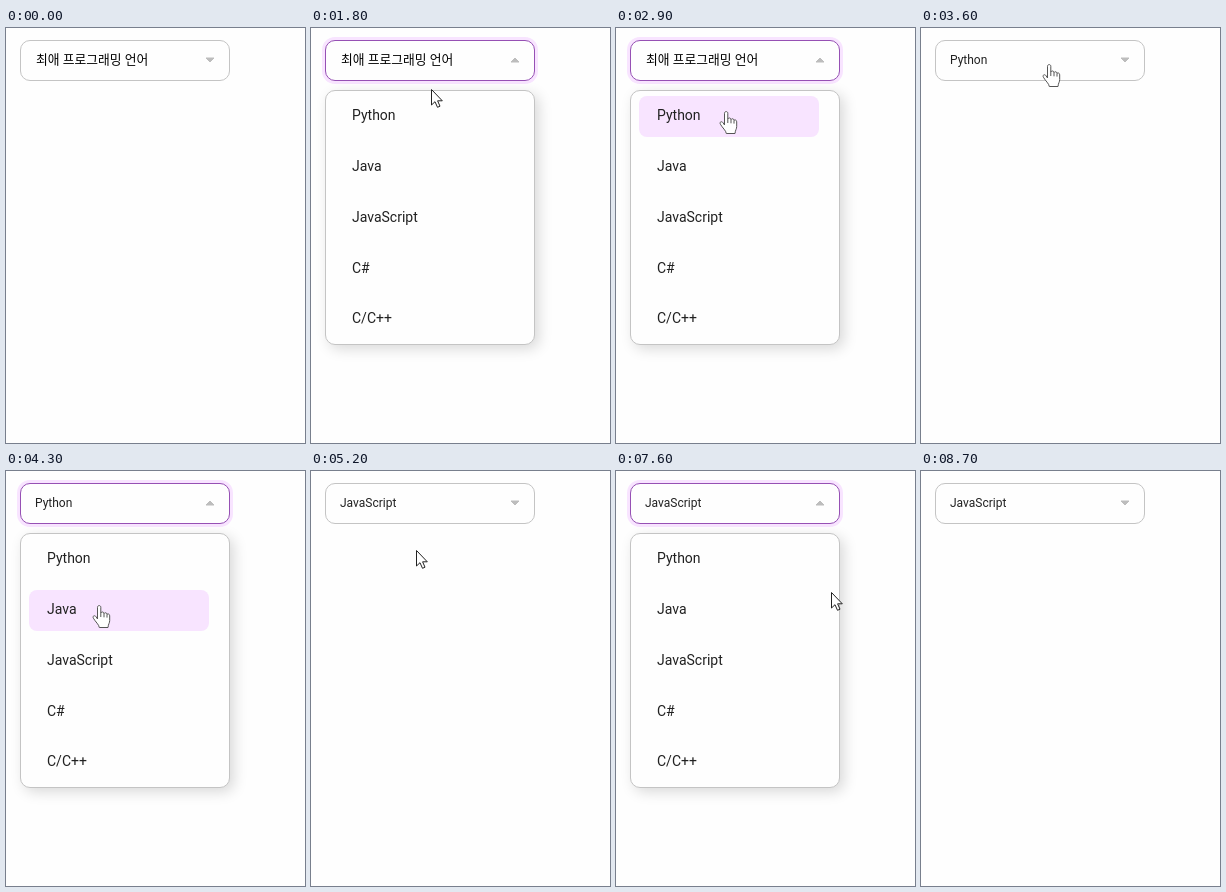
Write an HTML page that moves like this. It is 299 px wide and 415 px high and loops after 9.9 s.

```html
<!DOCTYPE html>
<html lang="ko">
<head>
<meta charset="utf-8">
<style>
  html, body { margin: 0; width: 100%; height: 100%; overflow: hidden; background: #fefefe; }
  body { position: relative; font-family: Roboto, "Noto Sans CJK KR", "Noto Sans CJK", sans-serif; color: #212121; }
  .select, .menu {
    position: absolute; left: 14px; width: 210px; box-sizing: border-box;
    border: 1px solid #c4c4c4; border-radius: 10px; background: #fefefe;
  }
  .select { top: 12px; height: 41px; font-size: 12px; line-height: 38px; padding-left: 14px; }
  .select.focus { border-color: #9650b4; box-shadow: 0 0 0 3px #f8e4ff; }
  .select.placeholder { padding-left: 15px; font-size: 12.8px; font-weight: 300; color: #000; }
  .menu { top: 62px; height: 255px; box-shadow: 4px 4px 14px rgba(0, 0, 0, .15); }
  .item {
    position: absolute; left: 8px; width: 180px; height: 41px; box-sizing: border-box;
    padding-left: 18px; border-radius: 8px; font-size: 14px; line-height: 38px;
  }
  .item.hover { background: #f8e4ff; }
  svg { position: absolute; left: 0; top: 0; width: 299px; height: 415px; }
</style>
</head>
<body>
<div class="select"></div>
<div class="menu"></div>
<svg viewBox="0 0 299 415">
  <path id="caret" fill="#bdbdbd" stroke="#bdbdbd" stroke-linejoin="round"/>
  <g id="cursor" fill="#fff" stroke-linejoin="round">
    <path id="arrow" stroke="#222" d="M-.5 -.5V15L3 11.7 5.5 17.3 8 16.2 5.6 10.8H10.3Z"/>
    <g id="hand" stroke="#555">
      <path d="M-1.5 13V1.3C-1.5 -1 1.8 -1 1.8 1.3V7C2.2 5.5 5 5.6 5 7.6C5.6 6.2 8 6.6 8 8.4C8.8 7.4 10.7 8 10.7 9.8V14.5C10.7 17 9.3 18 9 21.5H.3C0 18.5 -3.5 16 -5.6 12.2C-6.8 10 -4.3 8.8 -3 10.7Z"/>
      <path fill="none" d="M1.8 7V11M5 7.6V11.3M8 8.4V11.6"/>
    </g>
  </g>
</svg>
<script>
const LOOP = 9900, STEP = 100, PRESS = 100;
const ENTER = 100, LEAVE = 8700;
const languages = ["Python", "Java", "JavaScript", "C#", "C/C++"];

const linear = k => k;
const easeIn = k => k ** 3;
const easeOut = k => 1 - (1 - k) ** 2;

const entry = { x: 168, y: 328 };
const moves = [
  { from: 100, to: 700, x: 122, y: 35, ease: linear },
  { from: 1500, to: 2100, x: 115, y: 250, ease: easeIn },
  { from: 2200, to: 2900, x: 110, y: 84, ease: linear },
  { from: 3200, to: 3600, x: 128, y: 37, ease: linear },
  { from: 3900, to: 4600, x: 67, y: 208, ease: linear },
  { from: 5000, to: 5400, x: 119, y: 37, ease: easeOut },
  { from: 7200, to: 7800, x: 264, y: 165, ease: linear },
  { from: 8100, to: 8600, x: 266, y: 390, ease: linear }
];
const presses = [1300, 3000, 3800, 4900, 5600, 6400, 7100, 8100];

const find = selector => document.querySelector(selector);
const select = find(".select"), menu = find(".menu"), caret = find("#caret");
const cursor = find("#cursor"), arrow = find("#arrow"), hand = find("#hand");
const show = (el, on) => { el.style.display = on ? "" : "none"; };
const inside = (p, left, top, w, h) => p.x >= left && p.x < left + w && p.y >= top && p.y < top + h;
const rowTop = i => Math.round(68.2 + 50.8 * i);
const onHeader = p => inside(p, 14, 12, 210, 41);
const rowAt = p => languages.findIndex((_, i) => inside(p, 23, rowTop(i), 180, 41));

const items = languages.map((name, i) => {
  const item = document.createElement("div");
  item.className = "item";
  item.textContent = name;
  item.style.top = rowTop(i) - 63 + "px";
  return menu.appendChild(item);
});

function pointerAt(t) {
  let { x, y } = entry;
  for (const move of moves) {
    if (t <= move.from) break;
    const k = move.ease(Math.min(1, (t - move.from) / (move.to - move.from)));
    x += (move.x - x) * k;
    y += (move.y - y) * k;
  }
  return { x: Math.round(x), y: Math.round(y) };
}

// Replays the clicks: pressing moves the focus, releasing toggles the menu or picks a row.
function stateAt(t) {
  const state = { open: false, focus: false, chosen: -1 };
  for (const press of presses) {
    if (t < press) break;
    const point = pointerAt(press), header = onHeader(point);
    state.focus = header;
    if (t < press + PRESS) break;
    if (state.open && rowAt(point) >= 0) state.chosen = rowAt(point);
    state.open = header && !state.open;
  }
  return state;
}

function draw(t) {
  const { open, focus, chosen } = stateAt(t);
  const point = pointerAt(t);
  const visible = t >= ENTER && t < LEAVE;
  const hovered = open && visible ? rowAt(point) : -1;
  const pointing = onHeader(point) || hovered >= 0;

  select.textContent = languages[chosen] || "최애 프로그래밍 언어";
  select.classList.toggle("placeholder", chosen < 0);
  select.classList.toggle("focus", focus);
  caret.setAttribute("d", open ? "M200 34H208L204 30Z" : "M200 30H208L204 34Z");
  show(menu, open);
  items.forEach((item, i) => item.classList.toggle("hover", i === hovered));

  show(cursor, visible);
  show(hand, pointing);
  show(arrow, !pointing);
  cursor.setAttribute("transform", `translate(${point.x} ${point.y})`);
}

const start = performance.now();
function frame() {
  const t = (performance.now() - start) % LOOP;
  draw(Math.floor(t / STEP) * STEP);
  requestAnimationFrame(frame);
}
frame();
</script>
</body>
</html>
```
